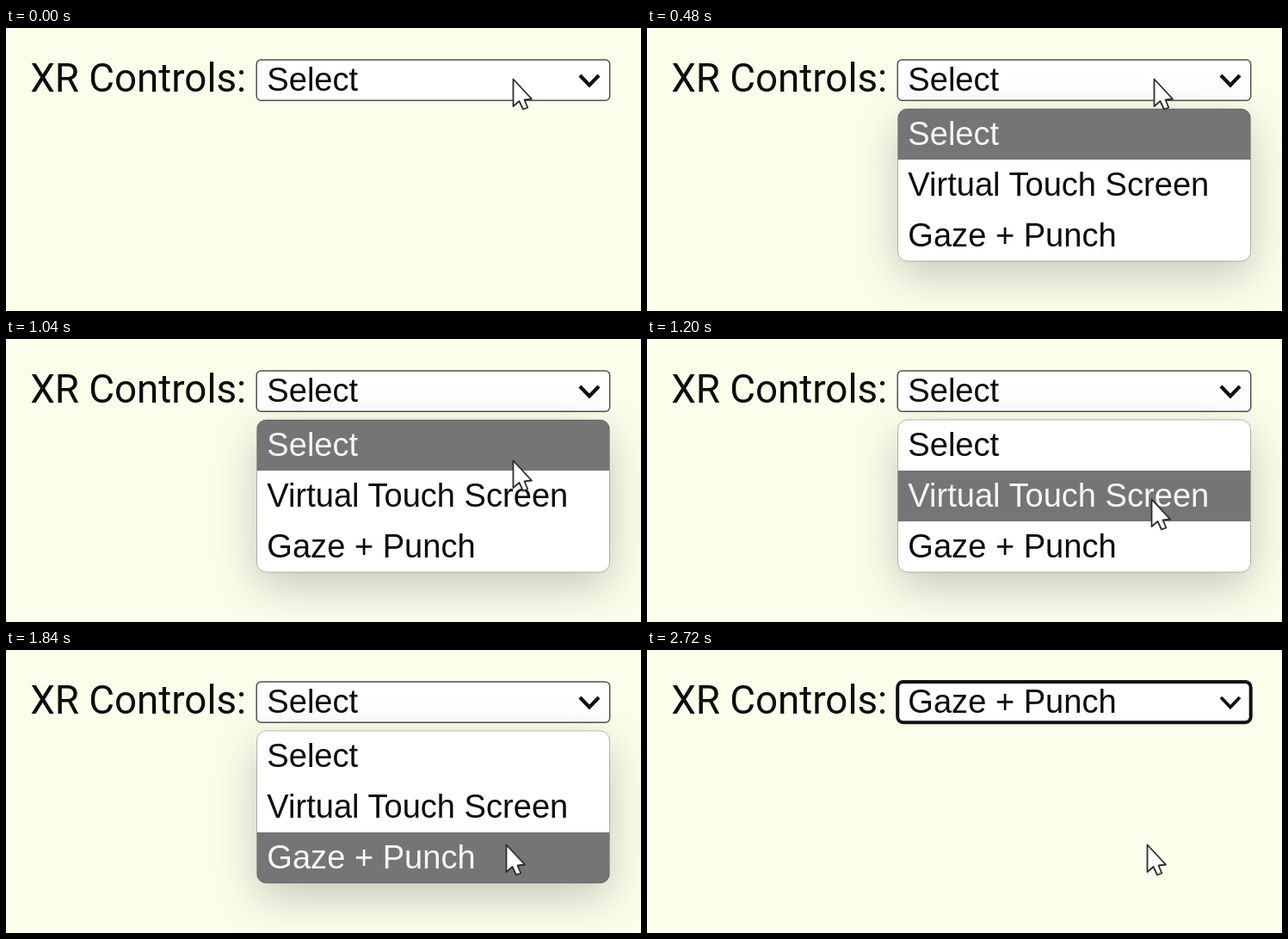
An HTML page with a canvas that plays this animation: 738x329 px, repeating every 2800 ms.

```html
<!DOCTYPE html>
<html lang="en">
<head>
<meta charset="utf-8">
<title>XR Controls</title>
<style>
html, body { margin: 0; width: 100%; height: 100%; overflow: hidden; background: #fdfdec; }
canvas { display: block; filter: blur(.55px); }
</style>
</head>
<body>
<canvas id="stage" width="738" height="329"></canvas>
<script>
const ctx = document.getElementById('stage').getContext('2d');
const LOOP = 2800, STEP = 80, OPEN = 320, CLOSE = 1920;
const LABEL = '45.7px Roboto, sans-serif';
const MENU = '38.1px "Liberation Sans", Arial, sans-serif';
const OPTIONS = ['Select', 'Virtual Touch Screen', 'Gaze + Punch'];
const POPUP = { x: 291.5, y: 94, w: 410, h: 177, r: 11, row: 59 };

// pointer tip: time, x, y
const PATH = [
  [800, 589, 59], [880, 589, 72], [960, 589, 108], [1040, 589, 141],
  [1200, 586, 186], [1360, 583, 217], [1440, 582, 223], [1520, 581, 226]
];

function pointerAt(t) {
  if (t <= PATH[0][0]) return PATH[0].slice(1);
  for (let i = 1; i < PATH.length; i++) {
    const [t0, x0, y0] = PATH[i - 1], [t1, x1, y1] = PATH[i];
    if (t <= t1) {
      const k = (t - t0) / (t1 - t0);
      return [x0 + (x1 - x0) * k, y0 + (y1 - y0) * k];
    }
  }
  return PATH[PATH.length - 1].slice(1);
}

function text(str, x, y, font, color) {
  ctx.font = font;
  ctx.fillStyle = color;
  ctx.fillText(str, x, y);
}

function roundBox(x, y, w, h, r) {
  ctx.beginPath();
  ctx.roundRect(x, y, w, h, r);
}

function drawSelect(value, focused) {
  roundBox(291.2, 37, 410.5, 47.3, focused ? 6.5 : 5);
  ctx.fillStyle = '#fff';
  ctx.fill();
  ctx.strokeStyle = focused ? '#101014' : '#505050';
  ctx.lineWidth = focused ? 4 : 1.5;
  ctx.stroke();
  text(value, 303.3, 73.3, MENU, '#0c0c0c');

  ctx.beginPath();
  ctx.moveTo(667, 55);
  ctx.lineTo(678, 66.5);
  ctx.lineTo(689, 55);
  ctx.strokeStyle = '#111';
  ctx.lineWidth = focused ? 3.8 : 4.2;
  ctx.stroke();
}

function drawPopup(active) {
  const { x, y, w, h, r, row } = POPUP;
  ctx.save();
  ctx.shadowColor = 'rgba(0,0,0,.22)';
  ctx.shadowBlur = 52;
  ctx.shadowOffsetY = 16;
  roundBox(x, y, w, h, r);
  ctx.fillStyle = '#fff';
  ctx.fill();
  ctx.restore();

  ctx.save();
  roundBox(x, y, w, h, r);
  ctx.clip();
  ctx.fillStyle = '#757575';
  ctx.fillRect(x, y + active * row, w, row);
  ctx.restore();

  roundBox(x, y, w, h, r);
  ctx.strokeStyle = 'rgba(0,0,0,.28)';
  ctx.lineWidth = 1;
  ctx.stroke();
  OPTIONS.forEach((name, i) =>
    text(name, 303.3, 136 + i * row, MENU, i === active ? '#f6f6f6' : '#0c0c0c'));
}

function drawPointer(x, y) {
  ctx.save();
  ctx.translate(x + 0.5, y + 0.5);
  ctx.beginPath();
  ctx.moveTo(0, 0);
  [[0, 31.5], [7, 25.5], [11.5, 35], [16.8, 33], [13, 24], [21.5, 23]]
    .forEach(p => ctx.lineTo(...p));
  ctx.closePath();
  ctx.fillStyle = '#fff';
  ctx.fill();
  ctx.strokeStyle = '#2c2c30';
  ctx.lineWidth = 1.8;
  ctx.lineJoin = 'round';
  ctx.stroke();
  ctx.restore();
}

function draw(t) {
  const [px, py] = pointerAt(t);
  const done = t >= CLOSE;
  ctx.fillStyle = '#fdfdec';
  ctx.fillRect(0, 0, 738, 329);
  ctx.fontKerning = 'normal';
  text('XR Controls:', 28.2, 74, LABEL, '#0c0c0c');
  drawSelect(OPTIONS[done ? 2 : 0], done);
  if (t >= OPEN && !done) {
    drawPopup(Math.max(0, Math.floor((py - POPUP.y) / POPUP.row)));
  }
  drawPointer(px, py);
}

const start = performance.now();
function tick() {
  const t = (performance.now() - start) % LOOP;
  draw(Math.floor(t / STEP) * STEP);
  requestAnimationFrame(tick);
}
tick();
</script>
</body>
</html>
```
